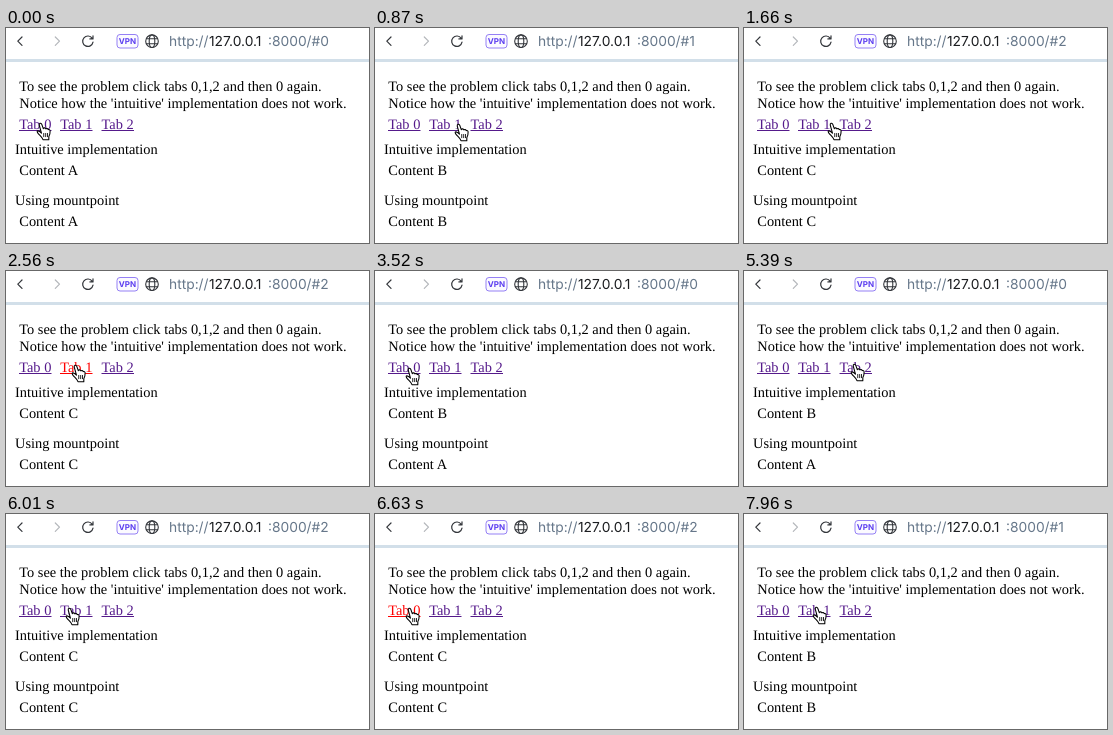
An HTML page for the animation above (8000 ms loop, 363 px wide and 215 px high).

```html
<!DOCTYPE html>
<html lang="en">
<head>
<meta charset="utf-8">
<title>Tabs demo</title>
<style>
html, body { margin: 0; width: 100%; height: 100%; overflow: hidden; background: #fff; }
svg { display: block; width: 100%; height: 100%; }
text { white-space: pre; text-rendering: geometricPrecision; }
.page { font: 14.4px "Liberation Serif", serif; }
.tab { fill: #551a8b; stroke: #551a8b; stroke-width: 0; }
.tab.pressed { fill: #f00; stroke: #f00; }
.tab path { stroke-width: 1; }
.url { font: 13.8px Inter, sans-serif; fill: #66778a; }
.icon { fill: none; stroke: #33363b; stroke-width: 1.2; stroke-linecap: round; stroke-linejoin: round; }
</style>
</head>
<body>
<svg viewBox="0 0 363 215">
  <rect y="31" width="363" height="3" fill="#d2dfe9"/>
  <g class="icon">
    <path d="M16 9 11.8 13.2 16 17.4"/>
    <path d="M49.3 9 53.5 13.2 49.3 17.4" stroke="#b4b7bb"/>
    <path d="M86.2 10.3A5.2 5.2 0 1 0 87 14.2M87 7.8V10.9H83.9"/>
    <g stroke-width="1.1">
      <circle cx="146" cy="13.2" r="6.3"/>
      <ellipse cx="146" cy="13.2" rx="2.8" ry="6.3"/>
      <path d="M140.5 10.7H151.5M140.5 15.7H151.5"/>
    </g>
  </g>
  <rect x="111" y="6.5" width="21" height="13.5" rx="3" fill="#fbfaff" stroke="#9580f5"/>
  <text x="121.5" y="16.2" text-anchor="middle" fill="#5b3df0" style="font:bold 8px Inter,sans-serif">VPN</text>
  <g class="url">
    <text x="163" y="18.2">http://</text>
    <text x="203" y="18.2" fill="#1b1d20">127.0.0.1</text>
    <text x="262" y="18.2" id="address"></text>
  </g>
  <g class="page">
    <text x="13.3" y="63">To see the problem click tabs 0,1,2 and then 0 again.</text>
    <text x="13.3" y="79.5">Notice how the 'intuitive' implementation does not work.</text>
    <g class="tab"><text x="13.2" y="101">Tab 0</text><path d="M13 102.5H45.5"/></g>
    <g class="tab"><text x="54.2" y="101">Tab 1</text><path d="M54 102.5H86.5"/></g>
    <g class="tab"><text x="95.5" y="101">Tab 2</text><path d="M95.5 102.5H128"/></g>
    <text x="9" y="126">Intuitive implementation</text>
    <text x="13.3" y="147" id="intuitive"></text>
    <text x="9" y="177">Using mountpoint</text>
    <text x="13.3" y="198" id="mounted"></text>
  </g>
  <g id="hand" stroke="#000" stroke-linejoin="round" stroke-linecap="round">
    <g transform="translate(-.5 -.8) scale(1.08)">
      <path fill="#fff" d="M4.6 10.2 2.6 3C2.1 1 4.2 .2 4.9 2L6.3 6C6.6 4.9 8.4 5 8.7 6.2 9.2 5.4 10.6 5.8 10.8 6.9 11.6 6.4 12.6 7 12.6 8.2 12.7 10.5 12.4 11.8 11.4 13.4V16.2H6C5.4 14.2 3.6 12.8 2 11 .2 9 .4 7.9 1.4 8 2.6 8.1 3.5 9 4.6 10.2Z"/>
      <path fill="none" stroke-width=".8" d="M6.7 10.4V13.4M8.5 10.4V13.4M10.2 10.4V13.4"/>
    </g>
  </g>
</svg>
<script>
const LOOP = 8000;
const START = { x: 31, y: 95 };

// Cursor moves: first step, last step, step count, destination
const moves = [
  [90, 270, 3, 63, 96],
  [700, 1040, 5, 90, 96],
  [1660, 1840, 3, 66, 94],
  [2830, 3260, 6, 31, 97],
  [4870, 5390, 7, 107, 93],
  [5830, 6190, 5, 34, 95],
  [6460, 6540, 2, 31, 94],
  [7440, 7610, 3, 69, 93],
];

// Clicks: press time, release time, tab, resulting contents
const clicks = [
  [350, 520, 1, "B", "B"],
  [1220, 1400, 2, "C", "C"],
  [2560, 2740, 1, "B", "B"],
  [3350, 3520, 0, "B", "A"],
  [5570, 5650, 2, "C", "C"],
  [6630, 6720, 0, "C", "A"],
  [7790, 7960, 1, "B", "B"],
];

const byId = id => document.getElementById(id);
const hand = byId("hand"), address = byId("address");
const intuitive = byId("intuitive"), mounted = byId("mounted");
const tabs = document.querySelectorAll(".tab");
const smooth = p => p * p * (3 - 2 * p);

function cursorAt(t) {
  let { x, y } = START;
  for (const [first, last, steps, toX, toY] of moves) {
    if (t < first) break;
    const step = Math.floor((t - first) / (last - first) * (steps - 1) + 1.02);
    const p = smooth(Math.min(1, step / steps));
    x += (toX - x) * p;
    y += (toY - y) * p;
  }
  return [Math.round(x), Math.round(y)];
}

function draw(t) {
  let current = 0, top = "A", bottom = "A", pressed = -1;
  for (const [down, up, tab, a, b] of clicks) {
    if (t >= up) [current, top, bottom] = [tab, a, b];
    else if (t >= down) pressed = tab;
  }
  address.textContent = ":8000/#" + current;
  intuitive.textContent = "Content " + top;
  mounted.textContent = "Content " + bottom;
  tabs.forEach((tab, i) => tab.classList.toggle("pressed", i === pressed));
  hand.setAttribute("transform", `translate(${cursorAt(t)})`);
}

const begin = performance.now();
function tick() {
  draw((performance.now() - begin) % LOOP);
  requestAnimationFrame(tick);
}
tick();
</script>
</body>
</html>
```
